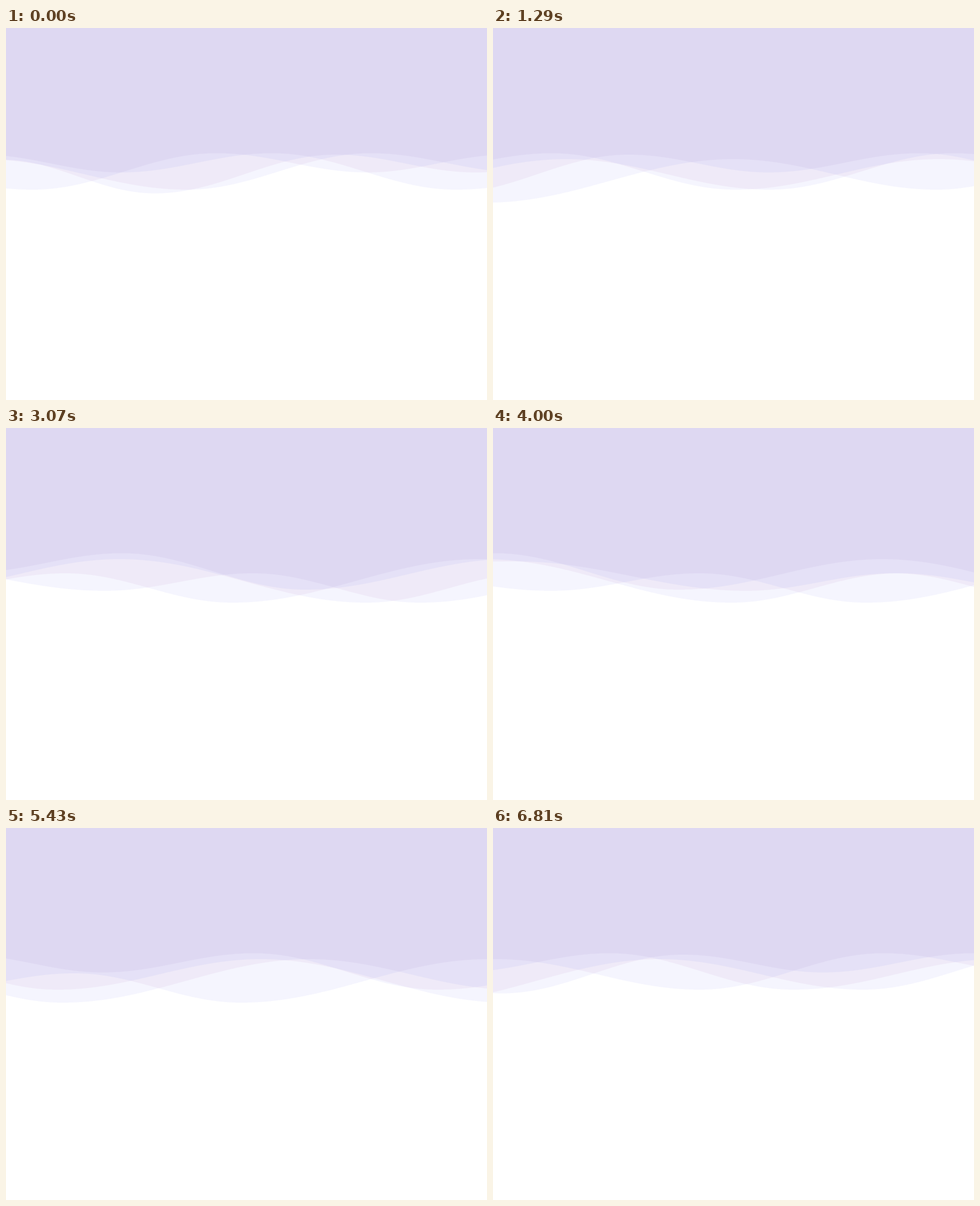
Animation of 851x658 px, one loop 6.9 s. Source, as an HTML page with a canvas:

```html
<!DOCTYPE html>
<html lang="en">
<head>
<meta charset="utf-8">
<title>Waves</title>
<style>
  html, body { margin: 0; width: 100%; height: 100%; overflow: hidden; background: #fff; }
  canvas { display: block; }
</style>
</head>
<body>
<canvas id="stage" width="851" height="658"></canvas>
<script>
const canvas = document.getElementById('stage');
const ctx = canvas.getContext('2d');
const W = canvas.width, H = canvas.height;
const LOOP = 6900, FPS = 14, LAST = 95;
const TURN = 49.4; // step at which the waves slide back

// Colour of an area by the number of wave edges above it
const TONES = ['#ded8f2', '#e5e1f7', '#efeaf8', '#f5f5fe', '#ffffff'];

// Crests and troughs of the outline shared by all waves
const OUTLINE = [
  [-1400, 236], [-994, 288], [-732, 257], [-437, 309], [0, 232], [360, 286],
  [685, 221.5], [952, 255.5], [1200, 224], [1520, 292.5], [1790, 233]
];

// Position of the crest at 0, and travel per step; mirrored waves run left
const WAVES = [
  { start: -313, speed: 29.5 },
  { start: -40, speed: 31 },
  { start: 1156, speed: -24.5 },
  { start: 1783, speed: -22.9 }
];

// Half a cosine wave between neighbouring crests and troughs
function outline(s) {
  const next = OUTLINE.findIndex(([x]) => x > s);
  if (next < 1) return OUTLINE.at(next)[1];
  const [x0, y0] = OUTLINE[next - 1], [x1, y1] = OUTLINE[next];
  return y0 + (y1 - y0) * (1 - Math.cos(Math.PI * (s - x0) / (x1 - x0))) / 2;
}

// Steady slide out and back, resting at the start and on every 20th tick
function travelAt(ms) {
  const tick = Math.min(LAST, Math.floor(ms * FPS / 1000 + 0.1));
  const step = tick - Math.min(tick, 2) - Math.floor((tick + 9) / 20);
  return TURN - Math.abs(TURN - step);
}

function draw(travel) {
  const edgesAt = x => WAVES
    .map(({ start, speed }) => outline(Math.sign(speed) * (x - start - speed * travel)))
    .sort((a, b) => a - b);
  const columns = Array.from({ length: W + 1 }, (_, x) => edgesAt(x));

  TONES.forEach((tone, level) => {
    ctx.beginPath();
    ctx.moveTo(0, H);
    columns.forEach((edges, x) => ctx.lineTo(x, level ? edges[level - 1] : 0));
    ctx.lineTo(W, H);
    ctx.fillStyle = tone;
    ctx.fill();
  });
}

function render() {
  draw(travelAt(performance.now() % LOOP));
  requestAnimationFrame(render);
}
render();
</script>
</body>
</html>
```
